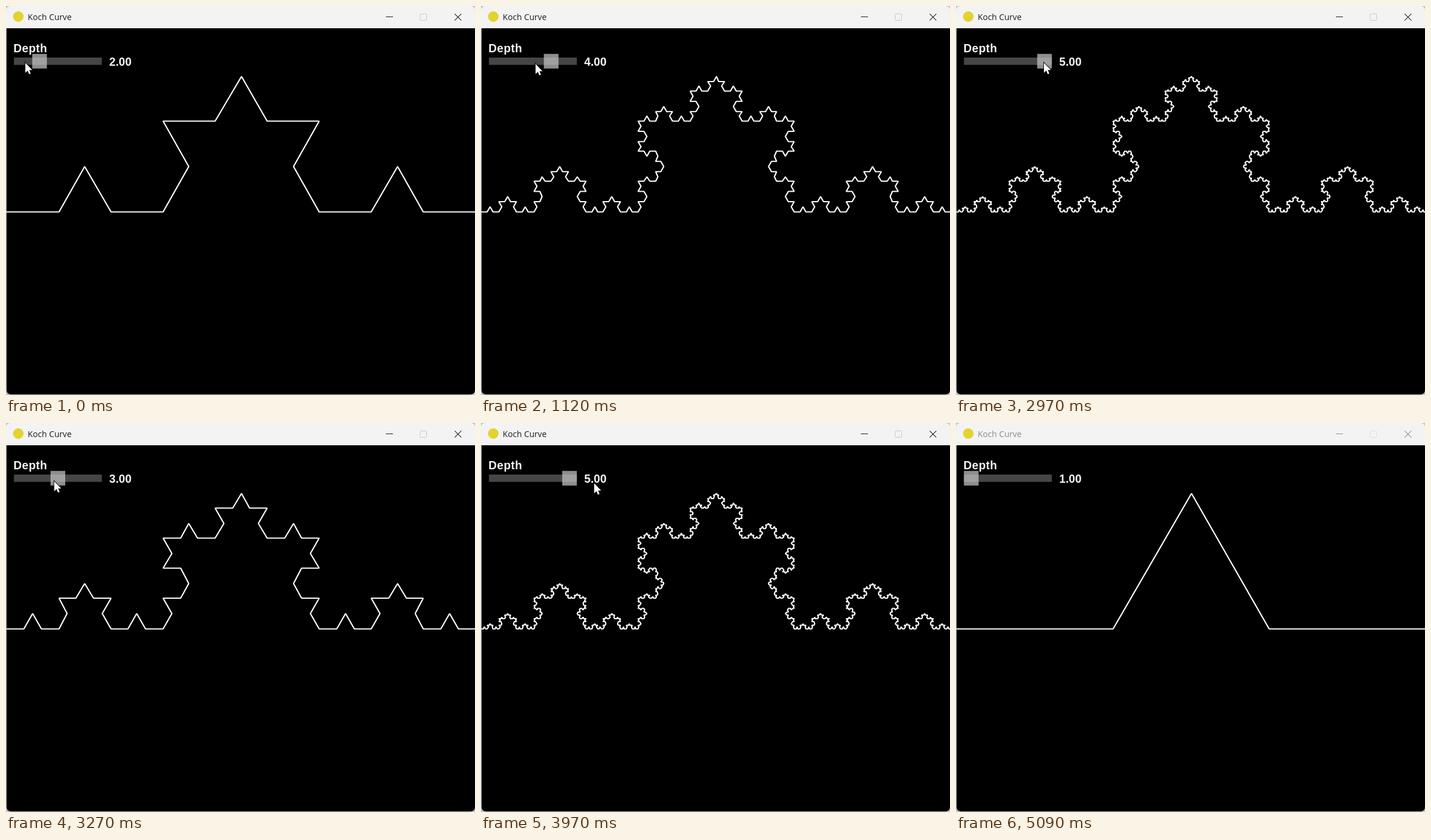
These frames come from a looping animation (800x664 px, 5.79 s). An HTML page:

```html
<!DOCTYPE html>
<html lang="en">
<head>
<meta charset="utf-8">
<title>Koch Curve</title>
<style>
  html, body { margin: 0; width: 100%; height: 100%; overflow: hidden; background: #c0c0c0; }
  svg { display: block; width: 800px; height: 664px; }
  .title { font: 14.2px "Open Sans", "Noto Sans", sans-serif; }
  .label { font: bold 19.6px "Liberation Sans", Arial, sans-serif; fill: #f4f4f4; }
</style>
</head>
<body>
<svg viewBox="0 0 800 664">
  <path d="M0 38V8Q0 0 8 0H792Q800 0 800 8V38Z" fill="#f3f3f3"/>
  <path d="M1 38H800V655Q800 663 792 663H9Q1 663 1 655Z"/>
  <circle cx="21" cy="18" r="9" fill="#e3d32f"/>
  <g id="ink" fill="#1a1a1a" stroke="#1a1a1a">
    <text class="title" x="37" y="24" stroke="none">Koch Curve</text>
    <path d="M648 18.5H660M765.3 13.3L776.7 24.7M776.7 13.3L765.3 24.7" fill="none" stroke-width="1.1"/>
  </g>
  <rect id="maxi" x="706.5" y="13.5" width="11" height="11" rx="1" fill="none" stroke="#c6c6c6"/>

  <path id="curve" fill="none" stroke="#fff" stroke-width="2.2" stroke-linecap="square" stroke-linejoin="bevel"/>

  <text class="label" x="12.8" y="79" letter-spacing=".4">Depth</text>
  <rect x="13.5" y="88" width="150" height="12.5" fill="#464646"/>
  <rect id="knob" y="81.75" width="25" height="25" fill="#bebebe" fill-opacity=".75"/>
  <text id="value" class="label" x="176" y="102"></text>

  <path id="cursor" d="M0 0V17L3.9 13.3L6.4 19.3L9.1 18.2L6.7 12.3H11.8Z" fill="#fff" stroke="#000" stroke-width="1.8" paint-order="stroke"/>
</svg>
<script>
const LOOP = 5790, BLUR_AT = 5090;
const $ = id => document.getElementById(id);

// pointer path: time, x, y
const path = [
  [0, 33, 97], [595, 50, 98], [1120, 93, 99], [1200, 96, 99], [1740, 118, 98],
  [1910, 122, 97], [2360, 138, 97], [2900, 150, 97], [3040, 150, 97],
  [3440, 40, 102], [3700, 120, 104], [3970, 193, 103], [4110, 205, 103],
  [4180, 205, 103], [4600, -30, 98], [LOOP, -30, 98]
];

const slope = (i, k) => (path[i + 1][k] - path[i][k]) / (path[i + 1][0] - path[i][0]);

// zero at turning points, harmonic mean elsewhere
function tangent(i, k) {
  if (i === 0) return slope(0, k);
  if (i === path.length - 1) return 0;
  const a = slope(i - 1, k), b = slope(i, k);
  return a * b > 0 ? 2 * a * b / (a + b) : 0;
}

function at(t, k) {
  let i = 0;
  while (i < path.length - 2 && t >= path[i + 1][0]) i++;
  const [p, q] = [path[i], path[i + 1]], d = q[0] - p[0];
  const u = (t - p[0]) / d, v = 1 - u;
  return p[k] * (1 + 2 * u) * v * v + q[k] * u * u * (3 - 2 * u)
    + d * (tangent(i, k) * u * v * v - tangent(i + 1, k) * u * u * v);
}

// the curve lives on a 640 x 500 pixel grid, shown at 125 %
function koch(depth) {
  let x = 0, y = 250, d = "";
  const size = 640 / 3 ** depth;
  const snap = v => 1.25 * Math.floor(v + 1e-6);
  const add = () => d += `${d ? "L" : "M"}${1.7 + snap(x)} ${39 + snap(y)}`;
  add();
  (function walk(n, turn) {
    if (n) return [0, -1, 1, 0].forEach(s => walk(n - 1, turn + s));
    x += size * Math.cos(turn * Math.PI / 3);
    y += size * Math.sin(turn * Math.PI / 3);
    add();
  })(depth, 0);
  return d;
}

const curves = [1, 2, 3, 4, 5].map(koch);
const depthAt = x => Math.max(1, Math.min(5, 2 + Math.floor((x - 28) / 30.4)));
let shown = 0;

function setDepth(depth) {
  if (depth === shown) return;
  shown = depth;
  $("curve").setAttribute("d", curves[depth - 1]);
  $("knob").setAttribute("x", 13.5 + (depth - 1) * 31.25);
  $("value").textContent = depth.toFixed(2);
}

function draw(t) {
  const x = at(t, 1), y = at(t, 2), ink = t < BLUR_AT ? "#1a1a1a" : "#8c8c8c";
  setDepth(depthAt(x));
  $("cursor").setAttribute("transform", `translate(${x.toFixed(1)} ${y.toFixed(1)})`);
  $("ink").setAttribute("fill", ink);
  $("ink").setAttribute("stroke", ink);
  $("maxi").setAttribute("stroke", t < BLUR_AT ? "#c6c6c6" : "#dcdcdc");
}

const start = performance.now();
function tick() {
  draw((performance.now() - start) % LOOP);
  requestAnimationFrame(tick);
}
tick();
</script>
</body>
</html>
```
